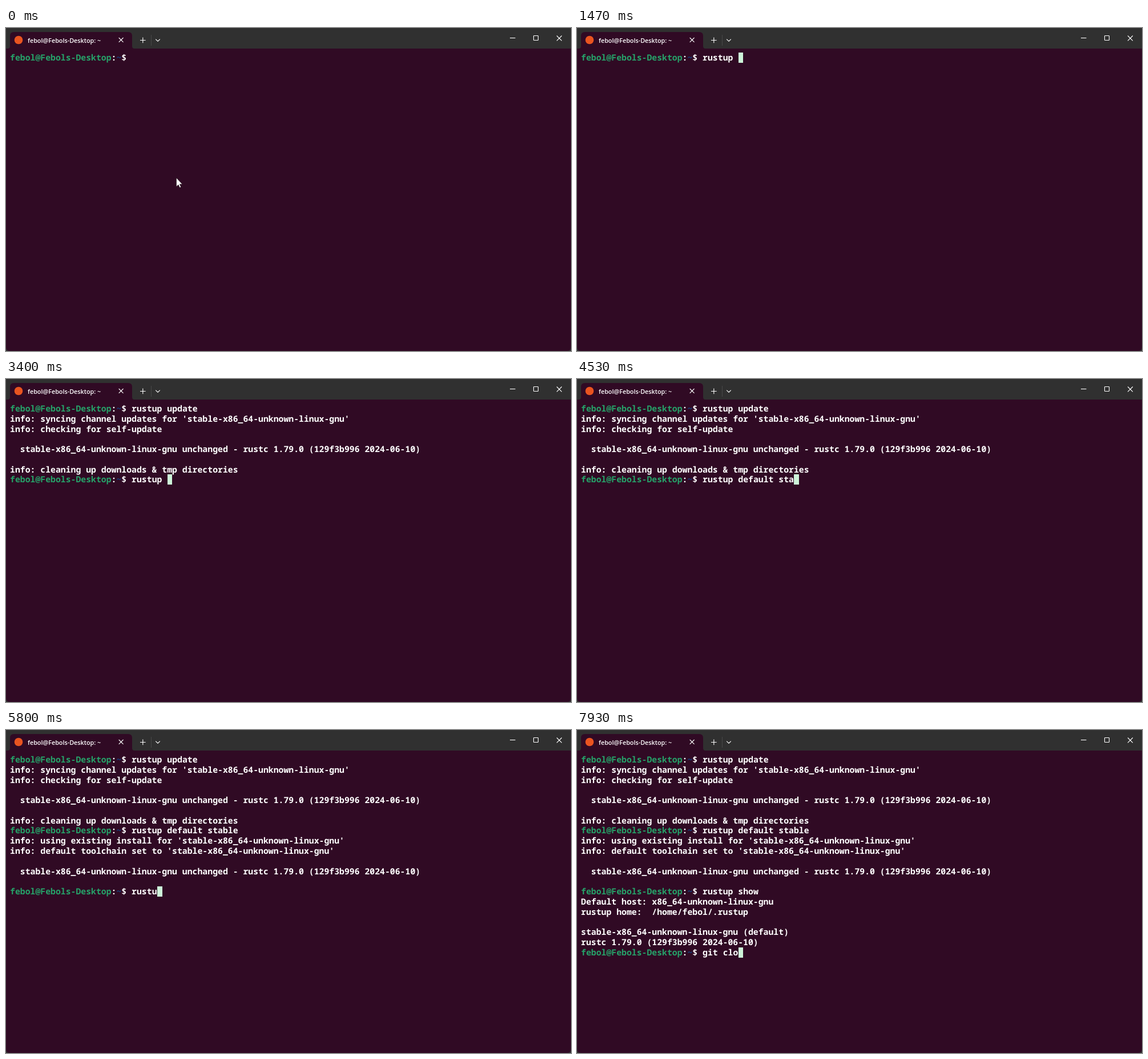
An HTML page that plays this animation: 990 by 566 pixels, repeating every 8 s.

```html
<!DOCTYPE html>
<html lang="en">
<head>
<meta charset="utf-8">
<title>Terminal</title>
<style>
  html, body { margin: 0; width: 100%; height: 100%; overflow: hidden; background: #303030; }
  svg { display: block; width: 990px; height: 566px; }
  .icon { fill: none; stroke: #fff; stroke-width: 1.1; }
  .title { font: 600 10.8px "Open Sans", "Noto Sans", sans-serif; fill: #fff; }
  #rows text {
    font: 600 14.815px "Noto Sans Mono", "DejaVu Sans Mono", monospace;
    white-space: pre;
    text-rendering: geometricPrecision;
    font-variant-ligatures: none;
    fill: #fff;
  }
  #rows .user { fill: #26a269; }
  #rows .path { fill: #12488b; }
</style>
</head>
<body>
<svg viewBox="0 0 990 566" xmlns="http://www.w3.org/2000/svg">
  <rect width="990" height="566" fill="#303030"/>
  <path d="M0 36H990V559Q990 566 983 566H7Q0 566 0 559Z" fill="#300a24"/>
  <path d="M3 36Q7 36 7 32V14Q7 7 14 7H214Q221 7 221 14V32Q221 36 225 36Z" fill="#300a24"/>
  <circle cx="22" cy="21" r="7.3" fill="#e95420"/>
  <text class="title" id="title" x="38" y="25.7"></text>
  <path d="M254.5 12V31" stroke="#474747"/>
  <g class="icon">
    <path d="M197.7 17L205.5 24.8M205.5 17L197.7 24.8"/>
    <path d="M235 21.5H244.6M239.8 16.5V26.3"/>
    <path d="M262.2 19.6L266 23.2L269.8 19.6"/>
    <path d="M883 17.5H892.5"/>
    <rect x="924.5" y="13.5" width="8" height="8" rx="0.8"/>
    <path d="M965 13.5L973.8 22.3M973.8 13.5L965 22.3"/>
  </g>
  <rect id="caret" height="18" fill="#cdf4d9"/>
  <g id="rows"></g>
  <path id="pointer" d="M298.5 262.5V278L302 274.7L304.4 279.8L306.7 278.8L304.4 273.8H309Z"
        fill="#fff" stroke="#16050f" stroke-width="0.6"/>
</svg>
<script>
  const LOOP = 8000, LEFT = 7, TOP = 43, CELL = 8.889, LINE = 17.78;
  const USER = 'febol@Febols-Desktop';
  const PROMPT = USER + ':~$ ';
  const TARGET = 'stable-x86_64-unknown-linux-gnu';
  const VERSION = 'rustc 1.79.0 (129f3b996 2024-06-10)';
  const SUMMARY = `\n  ${TARGET} unchanged - ${VERSION}\n\n`;

  const output = [];
  const print = (time, text) => output.push({ time, text });
  const type = (first, last, text) => [...text].forEach((char, i) =>
    print(first + (last - first) * i / Math.max(1, text.length - 1), char));

  print(0, PROMPT);
  type(800, 1200, 'rustu');
  type(1400, 1470, 'p ');
  type(1730, 1730, 'u');
  type(1870, 2130, 'pdat');
  print(2270, 'e');
  print(2330, `\ninfo: syncing channel updates for '${TARGET}'\n`);
  print(2400, 'info: checking for self-update\n');
  print(2470, SUMMARY + 'info: cleaning up downloads & tmp directories\n' + PROMPT);

  type(2730, 3130, 'rustu');
  type(3270, 3400, 'p ');
  type(3530, 3600, 'de');
  type(3800, 3930, 'fau');
  type(4070, 4330, 'lt s');
  type(4470, 4530, 'ta');
  type(4670, 4800, 'ble');
  print(4930, `\ninfo: using existing install for '${TARGET}'\n`);
  print(5000, `info: default toolchain set to '${TARGET}'\n` + SUMMARY + PROMPT);

  type(5470, 5800, 'rustu');
  type(6070, 6330, 'p s');
  type(6530, 6670, 'how');
  print(6800, '\n');
  print(6870, `Default host: ${TARGET.slice(7)}\nrustup home:  /home/febol/.rustup\n\n` +
    `${TARGET} (default)\n${VERSION}\n` + PROMPT);

  print(7400, 'g');
  print(7500, 'it');
  print(7600, ' ');
  type(7800, 7930, 'clo');

  const byId = id => document.getElementById(id);
  const rows = byId('rows'), caret = byId('caret'), pointer = byId('pointer');
  byId('title').textContent = USER + ': ~';

  function make(name, attrs, text = '') {
    const node = document.createElementNS('http://www.w3.org/2000/svg', name);
    for (const key in attrs) node.setAttribute(key, attrs[key]);
    node.textContent = text;
    return node;
  }

  function makeRow(line, index) {
    const row = make('text', { x: LEFT, y: TOP + 14 + index * LINE });
    const prompted = line.startsWith(PROMPT);
    const parts = prompted
      ? [['user', USER], ['', ':'], ['path', '~'], ['', line.slice(USER.length + 2)]]
      : [['', line]];
    row.append(...parts.map(([style, text]) => make('tspan', { class: style }, text)));
    return row;
  }

  let shown = null;
  function draw(time) {
    const screen = output.filter(o => o.time <= time).map(o => o.text).join('');
    if (screen !== shown) {
      shown = screen;
      const lines = screen.split('\n');
      rows.replaceChildren(...lines.map(makeRow));
      const column = lines[lines.length - 1].length;
      const left = Math.round(LEFT + column * CELL);
      caret.setAttribute('x', left);
      caret.setAttribute('width', Math.round(LEFT + (column + 1) * CELL) - left);
      caret.setAttribute('y', Math.round(TOP + (lines.length - 1) * LINE));
    }
    const blinkedOff = time < 130 || (time >= 670 && time < 800);
    caret.setAttribute('visibility', blinkedOff ? 'hidden' : 'visible');
    pointer.setAttribute('visibility', time < 470 ? 'visible' : 'hidden');
  }

  const start = performance.now();
  function tick() {
    draw((performance.now() - start) % LOOP);
    requestAnimationFrame(tick);
  }
  tick();
</script>
</body>
</html>
```
